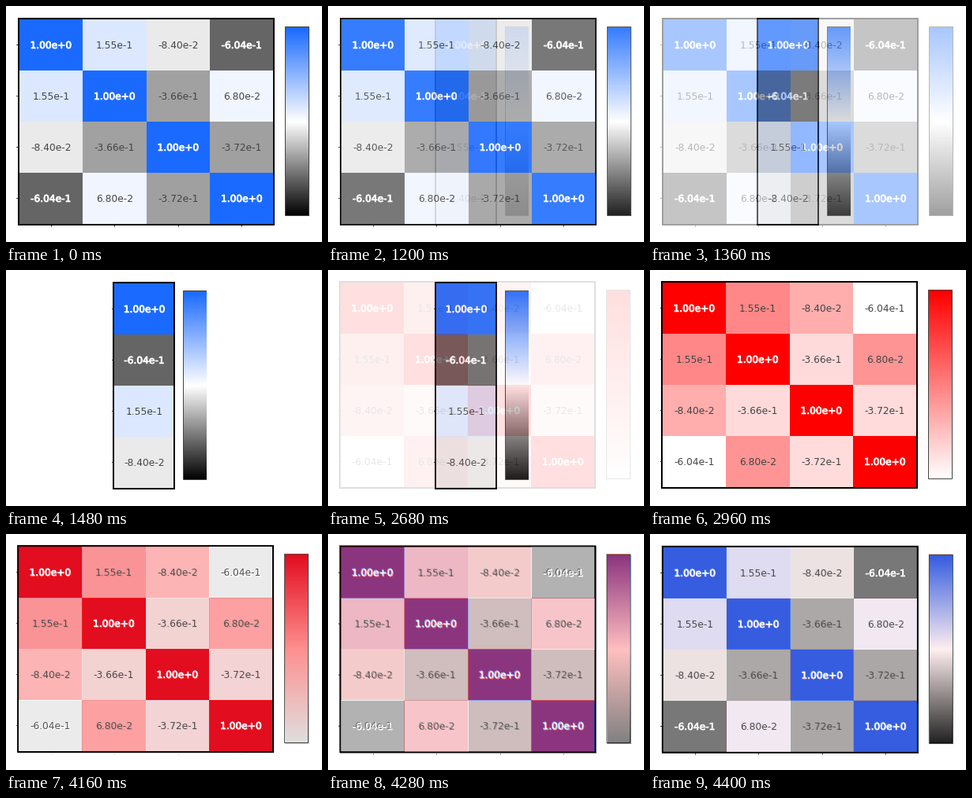
Write a matplotlib script that moves like this. It is 400x300 px and loops after 4440 ms.

```python
import numpy as np
import matplotlib.pyplot as plt
import matplotlib.patheffects as pe
from matplotlib.animation import FuncAnimation
from matplotlib.colors import LinearSegmentedColormap, Normalize
from matplotlib.patches import Rectangle

W, H, DPI = 400, 300, 100
PX = 72 / DPI
STEP, HOLD, FADE = 40, 30, 8      # ms per frame, still frames, fade steps
SPAN = HOLD + FADE - 1
INK = "#444444"

CORR = np.array([
    [1.0, 0.155, -0.084, -0.604],
    [0.155, 1.0, -0.366, 0.068],
    [-0.084, -0.366, 1.0, -0.372],
    [-0.604, 0.068, -0.372, 1.0],
])
COLUMN = CORR[0, [0, 3, 1, 2]].reshape(4, 1)

DIVERGING = LinearSegmentedColormap.from_list(
    "diverging", ["#000000", "#ffffff", "#1a6aff"], N=511)
REDS = LinearSegmentedColormap.from_list("reds", ["#ffffff", "#ff0000"], N=511)

plt.rcParams["font.family"] = "DejaVu Sans"
fig = plt.figure(figsize=(W / DPI, H / DPI), dpi=DPI, facecolor="white")


def stage():
    fig.clear()
    ax = fig.add_axes([0, 0, 1, 1])
    ax.set_axis_off()
    return ax


def fit(ax):
    ax.set_xlim(0, W)
    ax.set_ylim(H, 0)


def box(ax, x0, y0, x1, y1, color, z=1):
    ax.add_patch(Rectangle((x0, y0), x1 - x0, y1 - y0, facecolor=color,
                           linewidth=0, antialiased=False, zorder=z))


def frame(ax, x0, y0, x1, y1, color, width, z):
    ax.add_patch(Rectangle((x0, y0), x1 - x0, y1 - y0, fill=False,
                           edgecolor=color, linewidth=width * PX,
                           joinstyle="miter", snap=False, zorder=z))


def label(ax, x, y, value, rgb):
    mantissa, power = f"{value:.2e}".split("e")
    text = f"{mantissa}e{int(power):+d}"
    light = np.dot(rgb[:3], [0.299, 0.587, 0.114]) < 0.45
    color = "white" if light else INK
    t = ax.text(x, y + 4.4, text, color=color, fontsize=12.2 * PX,
                ha="center", va="baseline", zorder=5)
    if light:
        t.set_path_effects([pe.withStroke(linewidth=0.8 * PX, foreground=color)])


def colorbar(ax, x, y, cmap, cut):
    ax.imshow(np.linspace(1, 0, 240)[:, None], cmap=cmap, vmin=0, vmax=1,
              extent=(x, x + 30, y + 240, y), aspect="auto",
              interpolation="nearest", zorder=2)
    frame(ax, x - 0.5, y - 0.5, x + 29.5, y + 239.5, INK, 1, 3)
    box(ax, cut, 0, W, H, "white", 4)


def heatmap(data, x0, y0, cell_w, cmap, norm, bar_x, cut=W, tick=2, x_ticks=False):
    """Draw one heatmap with its colour bar and return the pixels."""
    ax = stage()
    rows, cols = data.shape
    cell_h = 65
    xs = x0 + cell_w * np.arange(cols + 1)
    ys = y0 + cell_h * np.arange(rows + 1)
    edges = np.floor(xs + 0.5)
    for r in range(rows):
        for c in range(cols):
            rgb = cmap(norm(data[r, c]))
            box(ax, edges[c], ys[r], edges[c + 1], ys[r + 1], rgb)
            label(ax, xs[c] + cell_w / 2, ys[r] + cell_h / 2, data[r, c], rgb)

    left, right = edges[0] - 1, edges[-1]
    top, bottom = ys[0] - 1, ys[-1] + 1
    for y in ys[:-1] + cell_h // 2:
        box(ax, left - 1 - tick, y, left - 1, y + 1, INK)
    if x_ticks:
        for x in np.round(xs[:-1] + cell_w / 2):
            box(ax, x, bottom + 1, x + 1, bottom + 3, INK)
    colorbar(ax, bar_x, y0 + 10, cmap, cut)
    frame(ax, left, top, right, bottom, "black", 2, 6)
    fit(ax)
    fig.canvas.draw()
    return np.array(fig.canvas.buffer_rgba())[..., :3] / 255.0


full = Normalize(-1, 1)
scenes = [
    heatmap(CORR, 16.5, 17, 80.5, DIVERGING, full, 354, x_ticks=True),
    heatmap(COLUMN, 136.6, 17, 76.8, DIVERGING, full, 225, cut=254, tick=1),
    heatmap(CORR, 15.5, 16, 80.5, REDS, Normalize(-0.604, 1), 353, tick=1),
]

view = stage()
picture = view.imshow(scenes[0], extent=(0, W, H, 0), aspect="auto",
                      interpolation="nearest")
fit(view)


def update(i):
    index, k = divmod(i, SPAN)
    t = max(0, k - HOLD + 1) / FADE
    following = scenes[(index + 1) % len(scenes)]
    picture.set_data((1 - t) * scenes[index] + t * following)
    return [picture]


anim = FuncAnimation(fig, update, frames=SPAN * len(scenes), interval=STEP,
                     repeat=True, repeat_delay=0, blit=False)
plt.show()
```
